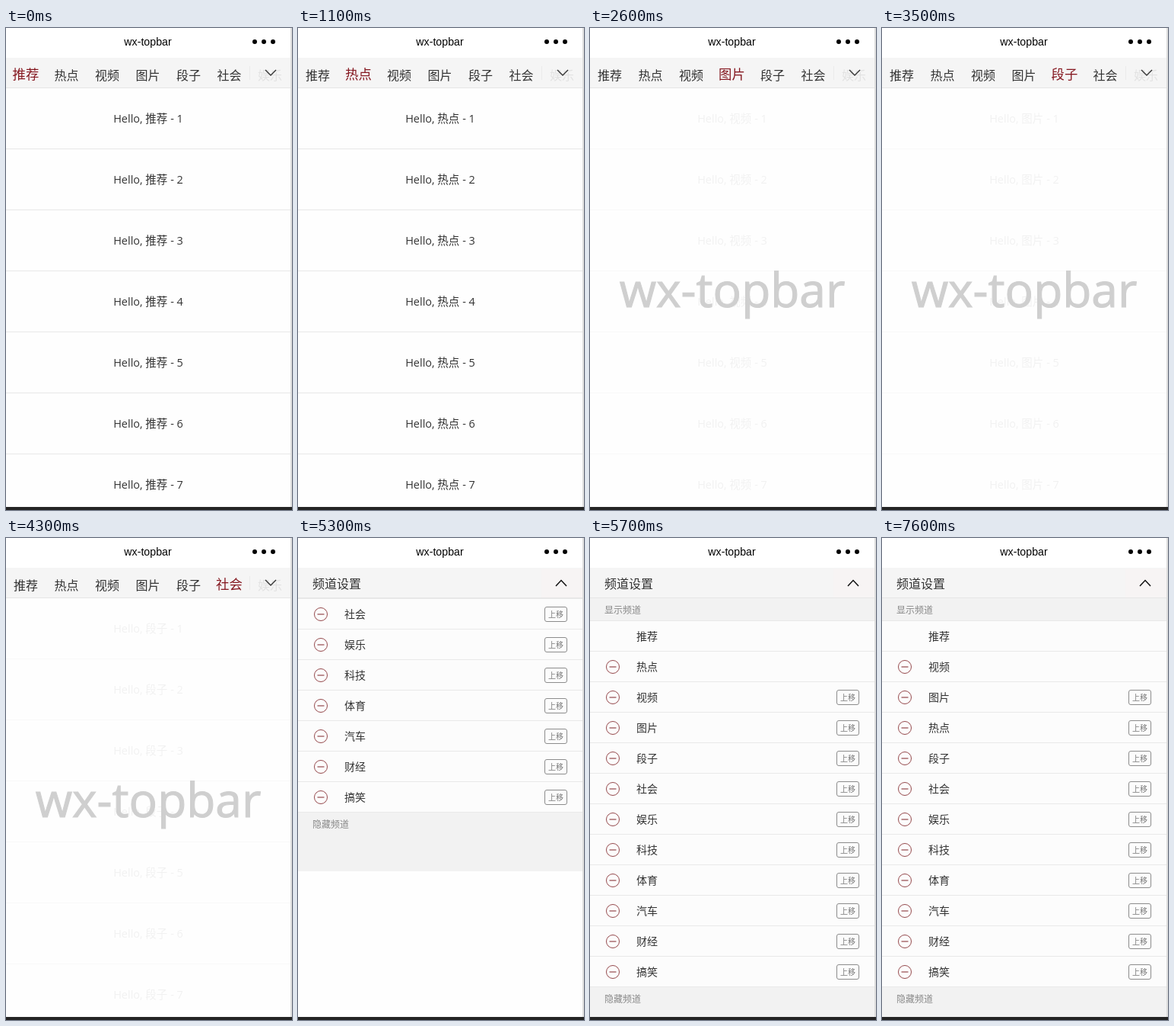
Write an HTML page that moves like this. It is 376x632 px and loops after 8000 ms.

```html
<!DOCTYPE html>
<html lang="zh">
<head>
<meta charset="utf-8">
<title>wx-topbar</title>
<style>
html, body { margin: 0; width: 100%; height: 100%; overflow: hidden; background: #fff; }
svg { display: block; width: 376px; height: 632px; }
text { font-family: "Open Sans", "Noto Sans CJK SC", "Noto Sans CJK", sans-serif; fill: #333; }
.cjk { font-family: "Noto Sans CJK SC", "Noto Sans CJK", sans-serif; }
.mid { text-anchor: middle; }
.title { font: 14.2px "Liberation Sans", Arial, sans-serif; fill: #000; }
.splash { font-size: 62.2px; fill: #cfcfcf; stroke: #cfcfcf; stroke-width: 1.1; }
.dim { fill: #888; }
.btn { fill: #777; }
</style>
</head>
<body>
<svg id="stage" viewBox="0 0 376 632"></svg>
<script>
const LOOP = 8000;
const TABS = ['推荐', '热点', '视频', '图片', '段子', '社会', '娱乐'];
const CHANNELS = [...TABS, '科技', '体育', '汽车', '财经', '搞笑'];
// [start, active tab, listed tab, splash shown]
const STEPS = [
  [0, 0, 0, 0], [600, 1, 0, 0], [700, 1, 0, 1], [1100, 1, 1, 0],
  [1700, 2, 1, 1], [2200, 2, 2, 0], [2600, 3, 2, 1], [3100, 3, 3, 0],
  [3500, 4, 3, 1], [3900, 4, 4, 0], [4300, 5, 4, 1], [4800, 5, 5, 0]
];
const OPEN = 5200, SLIDE_START = 5125, SLIDE_TIME = 500;
const SLIDE_DISTANCE = 580;
const SWAPS = [[6600, 1], [7600, 2]];

const stage = document.getElementById('stage');

function add(parent, tag, attrs, content) {
  const el = document.createElementNS('http://www.w3.org/2000/svg', tag);
  for (const key in attrs) el.setAttribute(key, attrs[key]);
  if (content) el.textContent = content;
  parent.appendChild(el);
  return el;
}
const group = parent => add(parent, 'g', {});
const rect = (parent, x, y, width, height, fill) =>
  add(parent, 'rect', { x, y, width, height, fill });
const stroke = (parent, d, color, width) =>
  add(parent, 'path', { d, fill: 'none', stroke: color, 'stroke-width': width });
// y is the middle of the glyphs
const label = (parent, x, y, size, content, cls = 'cjk') =>
  add(parent, 'text', { x, y: y + size * .38, 'font-size': size, class: cls }, content);
const show = (el, on) => el.setAttribute('visibility', on ? 'visible' : 'hidden');

rect(stage, 0, 0, 376, 632, '#fefefe');

// Article list
const lines = group(stage);
const list = group(stage);
const items = [];
for (let i = 0; i < 7; i++) {
  items.push(label(list, 187, 118.5 + i * 80, 14.5, '', 'mid'));
  if (i < 6) rect(lines, 0, 158 + i * 80, 374, 1, '#e8e8e8');
}
const splash = add(stage, 'text', { x: 187, y: 366.3, class: 'splash mid' }, 'wx-topbar');

// Channel panel
const panel = group(stage);
rect(panel, 0, 79, 374, 30, '#f2f2f2');
label(panel, 19, 94, 12, '显示频道', 'cjk dim');
rect(panel, 0, 108, 374, 481, '#fcfcfc');
rect(panel, 0, 108, 374, 1, '#e9e9e9');
const rows = CHANNELS.map((name, i) => {
  const y = 129 + i * 40;
  rect(panel, 0, y + 19, 374, 1, '#e9e9e9');
  if (i > 0) {
    add(panel, 'circle', { cx: 30, cy: y, r: 8.5, fill: 'none', stroke: '#95494c' });
    stroke(panel, `M25.5 ${y}h9`, '#95494c', 1.2);
  }
  if (i > 1) {
    add(panel, 'rect', {
      x: 324.5, y: y - 9.5, width: 29, height: 19, rx: 2.5, fill: 'none', stroke: '#8c8c8c'
    });
    label(panel, 339, y + .5, 10, '上移', 'cjk mid btn');
  }
  return label(panel, 61, y, 14, name);
});
rect(panel, 0, 589, 374, 77, '#f2f2f2');
label(panel, 19, 604.5, 12, '隐藏频道', 'cjk dim');

// Top area
rect(stage, 0, 0, 374, 39, '#fff');
add(stage, 'text', { x: 186.5, y: 23, class: 'title mid' }, 'wx-topbar');
for (const cx of [327, 339, 351]) add(stage, 'circle', { cx, cy: 18, r: 3 });
rect(stage, 0, 39, 374, 40, '#f5f5f5');
rect(stage, 0, 78, 374, 1, '#e6e6e6');

const bar = group(stage);
const tabs = TABS.map((name, i) => label(bar, 26 + i * 53.5, 61.5, 16, name, 'cjk mid'));
add(bar, 'rect', { x: 320, y: 40, width: 54, height: 38, fill: '#f6f6f6', opacity: .9 });
rect(bar, 320, 50, 1, 18, '#ebebeb');
stroke(bar, 'M341 55l7 7 7-7', '#333', 1.4);

const head = group(stage);
label(head, 19, 60, 16, '频道设置');
rect(head, 320, 40, 54, 38, '#f7f4f4');
stroke(head, 'M339 63l7-7.5 7 7.5', '#111', 1.5);

rect(stage, 374, 0, 2, 632, '#dcdcdc');
rect(stage, 0, 628, 376, 4, '#242424');

// CSS "ease": cubic-bezier(.25, .1, .25, 1)
function ease(x) {
  if (x <= 0) return 0;
  if (x >= 1) return 1;
  const curve = (a, b, s) => 3 * a * s * (1 - s) ** 2 + 3 * b * s * s * (1 - s) + s ** 3;
  let lo = 0, hi = 1;
  for (let i = 0; i < 24; i++) {
    const s = (lo + hi) / 2;
    if (curve(.25, .25, s) < x) lo = s; else hi = s;
  }
  return curve(.1, 1, lo);
}

function drawTabs(t) {
  const [, active, listed, loading] = STEPS.filter(step => step[0] <= t).pop();
  tabs.forEach((tab, i) => {
    const on = i === active;
    const size = on ? 17.4 : 16;
    tab.setAttribute('font-size', size);
    tab.setAttribute('y', (on ? 60.5 : 61.5) + size * .38);
    tab.style.fill = on ? '#851820' : '#333';
  });
  items.forEach((item, i) => { item.textContent = `Hello, ${TABS[listed]} - ${i + 1}`; });
  list.setAttribute('opacity', loading ? .06 : 1);
  lines.setAttribute('opacity', loading ? .25 : 1);
  show(splash, loading);
}

function drawPanel(t) {
  const rest = 1 - ease((t - SLIDE_START) / SLIDE_TIME);
  panel.setAttribute('transform', `translate(0 ${Math.round(-SLIDE_DISTANCE * rest)})`);
  const order = CHANNELS.slice();
  for (const [start, i] of SWAPS) {
    if (t >= start) [order[i], order[i + 1]] = [order[i + 1], order[i]];
  }
  rows.forEach((row, i) => { row.textContent = order[i]; });
}

let last = -1;
function frame() {
  const t = Math.floor(performance.now() % LOOP / 100) * 100;
  if (t !== last) {
    last = t;
    const open = t >= OPEN;
    for (const el of [list, lines, bar]) show(el, !open);
    for (const el of [panel, head]) show(el, open);
    if (open) {
      show(splash, false);
      drawPanel(t);
    } else {
      drawTabs(t);
    }
  }
  requestAnimationFrame(frame);
}
frame();
</script>
</body>
</html>
```
